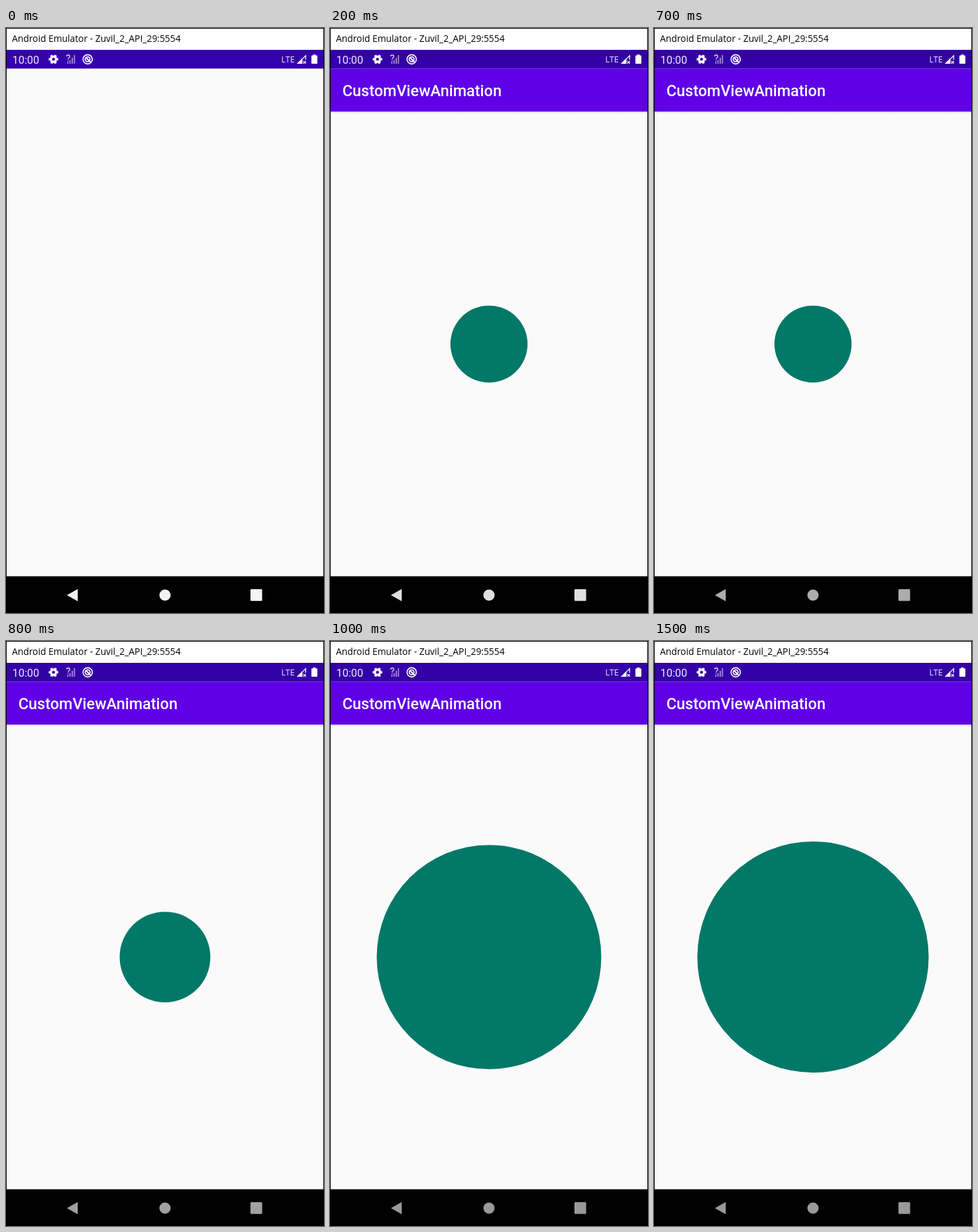
Recreate the animation shown at these times as an HTML page. Size 480 px wide and 884 px high, loop 1600 ms.

```html
<!DOCTYPE html>
<html lang="en">
<head>
<meta charset="utf-8">
<title>Circle growth</title>
<style>
  html, body { margin: 0; width: 100%; height: 100%; overflow: hidden; background: #000; }
  svg { display: block; width: 480px; height: 884px; }
  text { font-family: Roboto, sans-serif; fill: #fff; }
  .window { font: 13.83px "Open Sans", sans-serif; fill: #000; }
  .clock { font-size: 16.3px; fill: #f1ebfa; }
  .network { font: 12.6px "Open Sans", sans-serif; fill: #eee8f8; }
  .heading { font-size: 23.45px; font-weight: 500; }
  .line { fill: none; stroke: #fff; }
</style>
</head>
<body>
<svg viewBox="0 0 480 884">
  <defs>
    <linearGradient id="shade" x2="0" y2="1">
      <stop stop-color="#dedede"/>
      <stop offset="1" stop-color="#fafafa"/>
    </linearGradient>
  </defs>

  <rect width="480" height="884"/>
  <rect x="1" y="1" width="478" height="32" fill="#fff"/>
  <text class="window" x="9" y="21.3">Android Emulator - Zuvil_2_API_29:5554</text>
  <rect x="1" y="61" width="478" height="767.5" fill="#fafafa"/>

  <rect id="status" x="1" y="33" width="478" height="28.3"/>
  <text class="clock" x="9.6" y="53.5">10:00</text>
  <g class="line">
    <circle cx="71.7" cy="47.3" r="4" stroke-width="3.4"/>
    <circle cx="71.7" cy="47.3" r="6" stroke-width="2.6"
      pathLength="60" stroke-dasharray="5.4 4.6" stroke-dashoffset="2.7"/>
    <g stroke="#a98bdd" stroke-width="1.8">
      <path d="M93.4 54V50.5M96.7 54V48.5M100 54V45M103.3 54V41"/>
    </g>
    <path d="M91.5 43q0-2.3 2.4-2.3t2.4 2.2q0 1.2-1.2 2t-1.2 1.8M93.9 47.7v1.4"
      stroke="#d9caf0" stroke-width="1.4"/>
    <circle cx="123.3" cy="47.3" r="7" stroke-width="1.7"/>
    <circle cx="123.2" cy="47.2" r="3.6" stroke-width="1.8"/>
    <path d="M121 45l6.8 6.8" stroke-width="2"/>
  </g>
  <text class="network" x="415.5" y="52">LTE</text>
  <path d="M439 54L447.5 45.5V54z" fill="#fff"/>
  <path class="line" d="M446 53.3h-5.3L452.3 41.7V48M448.8 50l3.8 3.8M452.6 50l-3.8 3.8" stroke-width="1.3"/>
  <path d="M463.5 40h4v1.6h1.7q.8 0 .8.8V53.3q0 .8-.8.8h-7.4q-.8 0-.8-.8V42.4q0-.8.8-.8h1.7z" fill="#fff"/>

  <g id="app">
    <g id="fade">
      <rect x="1" y="126" width="478" height="4" fill="url(#shade)"/>
      <rect x="1" y="61.3" width="478" height="65" fill="#5f00e6"/>
      <circle id="disc" cx="240" cy="477.6" fill="#017868"/>
    </g>
    <text class="heading" x="18.8" y="102.8">CustomViewAnimation</text>
  </g>

  <g id="nav">
    <path d="M92 857L108.3 847.7V866.3z" stroke="none"/>
    <circle cx="240" cy="857" r="8.5"/>
    <rect x="369" y="848" width="17.6" height="17.8" rx="1.2"/>
  </g>
</svg>

<script>
  const LOOP = 1600, TICK = 100;
  const GROW_START = 743, GROW_TIME = 297;
  const R_MIN = 58.2, R_MAX = 174.6;
  const el = id => document.getElementById(id);
  const [status, app, fade, disc, nav] = ['status', 'app', 'fade', 'disc', 'nav'].map(el);
  const clamp = x => Math.min(1, Math.max(0, x));
  const easeInOut = x => 0.5 - Math.cos(Math.PI * x) / 2;

  function draw() {
    // The screen refreshes ten times a second.
    const t = Math.floor(performance.now() % LOOP / TICK) * TICK;
    const grow = easeInOut(clamp((t - GROW_START) / GROW_TIME));
    const grey = Math.round(Math.max(153, 243 - t * 0.102));

    app.setAttribute('visibility', t < 100 ? 'hidden' : 'visible');
    fade.setAttribute('opacity', t < 200 ? 0.6 : 1);
    status.setAttribute('fill', t < 200 ? '#3500ad' : '#3400a7');
    disc.setAttribute('r', R_MIN + (R_MAX - R_MIN) * grow);
    nav.setAttribute('fill', `rgb(${grey},${grey},${grey})`);
    requestAnimationFrame(draw);
  }
  draw();
</script>
</body>
</html>
```
